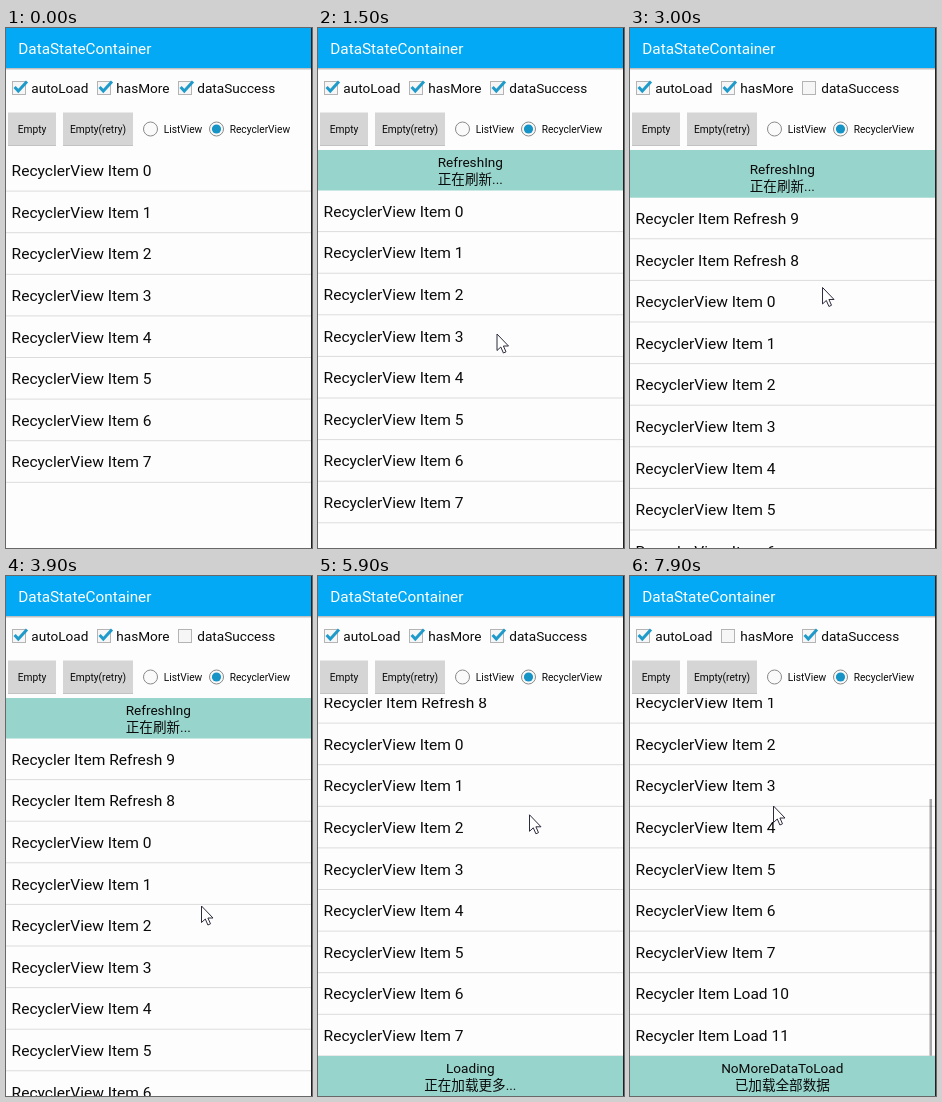
An HTML page for the animation above (8 s loop, 306 by 520 pixels).

```html
<!DOCTYPE html>
<html lang="en">
<head>
<meta charset="utf-8">
<title>DataStateContainer</title>
<style>
html, body { margin: 0; width: 100%; height: 100%; overflow: hidden; background: #fdfdfd; }
svg { display: block; width: 306px; height: 520px; }
text { font: 15.3px Roboto, "Noto Sans CJK SC", "Noto Sans CJK", sans-serif; fill: #0a0a0a; white-space: pre; }
.item { font-size: 15.55px; }
.mid { font-size: 13.6px; }
.small { font-size: 10.2px; }
.state { font-size: 13.6px; text-anchor: middle; }
</style>
</head>
<body>
<svg id="stage" viewBox="0 0 306 520" xmlns="http://www.w3.org/2000/svg">
  <defs>
    <clipPath id="view"><rect y="122" width="306" height="398"/></clipPath>
    <linearGradient id="shade" x2="0" y2="1">
      <stop stop-opacity=".3"/><stop offset="1" stop-opacity="0"/>
    </linearGradient>
  </defs>
  <rect width="306" height="520" fill="#fdfdfd"/>
  <g clip-path="url(#view)">
    <g id="list"></g>
    <g id="head"></g>
    <g id="foot"></g>
    <rect id="thumb" x="299.5" width="2.5" fill="#000" fill-opacity=".34"/>
  </g>
  <rect y="40" width="306" height="2.5" fill="url(#shade)"/>
  <rect width="306" height="40" fill="#03a9f4"/>
  <text x="12.3" y="26" style="fill:#fff">DataStateContainer</text>
  <g id="controls"></g>
  <rect x="305" width="1" height="520" fill="#222"/>
  <path id="cursor" d="M0 0V16.5L3.8 13L6.4 19L9 17.8L6.4 12H11.5Z" fill="#fff" stroke="#2b2b3c" stroke-linejoin="round"/>
</svg>
<script>
const LOOP = 8000, STEP = 100, TOP = 122, BAR = 40.5, ROW = 41.6, VIEW = 358;
const $ = id => document.getElementById(id);

function add(parent, tag, attrs, text) {
  const el = document.createElementNS('http://www.w3.org/2000/svg', tag);
  for (const k in attrs) el.setAttribute(k, attrs[k]);
  if (text) el.textContent = text;
  return parent.appendChild(el);
}
const show = (el, on) => el.setAttribute('visibility', on ? 'visible' : 'hidden');
const move = (el, x, y) => el.setAttribute('transform', `translate(${x} ${y})`);

// 0 before a, 1 after b, smooth between
function ease(t, a, b) {
  const p = Math.min(1, Math.max(0, (t - a) / (b - a)));
  return p * p * (3 - 2 * p);
}

const controls = $('controls');

function checkbox(x, label) {
  add(controls, 'rect', { x: x + .5, y: 53.5, width: 13, height: 13, fill: '#f6f6f6', stroke: '#b4b4b4' });
  const tick = add(controls, 'path', {
    d: `M${x + 2.6} 59l3.7 4l8.7 -9.4`, fill: 'none', stroke: '#1e9bcb', 'stroke-width': 3
  });
  add(controls, 'text', { x: x + 19.3, y: 65, class: 'mid' }, label);
  return tick;
}

function button(x, w, label) {
  add(controls, 'rect', { x, y: 84.5, width: w, height: 33.5, fill: '#d5d5d5' });
  add(controls, 'rect', { x, y: 117, width: w, height: 1, fill: '#c2c2c2' });
  add(controls, 'text', { x: x + w / 2, y: 105, class: 'small', 'text-anchor': 'middle' }, label);
}

function radio(x, label, on) {
  add(controls, 'circle', { cx: x, cy: 101, r: 7, fill: '#fafafa', stroke: '#8a8a8a' });
  if (on) add(controls, 'circle', { cx: x, cy: 101, r: 4.6, fill: '#1794c6' });
  add(controls, 'text', { x: x + 13.2, y: 105, class: 'small' }, label);
}

checkbox(6, 'autoLoad');
const moreTick = checkbox(91, 'hasMore');
const okTick = checkbox(172, 'dataSuccess');
button(2, 48, 'Empty');
button(57, 70, 'Empty(retry)');
radio(144.5, 'ListView', false);
radio(210.5, 'RecyclerView', true);

function banner(group, fillTop) {
  add(group, 'rect', { y: fillTop, width: 306, height: BAR - fillTop, fill: '#97d4cb' });
  return [17, 33.5].map(y => add(group, 'text', { x: 152.3, y, class: 'state', lang: 'zh-CN' }));
}
const label = (lines, texts) => lines.forEach((el, i) => el.textContent = texts[i]);

label(banner($('head'), -60), ['RefreshIng', '正在刷新...']);
const footText = banner($('foot'), 0);

const rows = Array.from({ length: 12 }, () => {
  const g = add($('list'), 'g');
  add(g, 'rect', { y: ROW - 1, width: 306, height: 1, fill: '#dcdcdc' });
  return { g, text: add(g, 'text', { x: 5.6, y: 26.3, class: 'item' }) };
});

const base = Array.from({ length: 8 }, (_, i) => 'RecyclerView Item ' + i);
const fresh = [9, 8].map(n => 'Recycler Item Refresh ' + n);
const loaded = [10, 11].map(n => 'Recycler Item Load ' + n);

// Pull down past the header, rest on it, then collapse
function pull(t, from, held, done) {
  const p = ease(t, from, held);
  return BAR * (p - ease(t, done, done + 300)) + 24 * Math.sin(Math.PI * p);
}

// Pointer trips: leave, arrive, x, y
const trips = [
  [100, 900, 179, 306],      // drag down
  [1500, 2500, 184, 58],     // untick dataSuccess
  [2600, 3200, 195.5, 330],  // drag down
  [3900, 4700, 177, 61],     // tick dataSuccess
  [4850, 5300, 172, 290],
  [5300, 5600, 185, 205],    // drag up
  [5600, 5900, 211.5, 238.8],
  [6500, 7300, 98, 58],      // untick hasMore
  [7450, 7700, 137, 312],
  [7700, 7900, 143.5, 230]   // drag up
];

function pointer(t) {
  let x = 168, y = 185;
  for (const [leave, arrive, tx, ty] of trips) {
    const p = ease(t, leave, arrive);
    x += (tx - x) * p;
    y += (ty - y) * p;
  }
  return [x, y];
}

function draw(t) {
  const items = [...(t >= 1900 ? fresh : []), ...base, ...(t >= 6300 ? loaded : [])];
  const drop = pull(t, 100, 900, 1700) + pull(t, 2700, 3200, 3900);
  const scroll = 57.6 * ease(t, 5300, 5600) + 2 * ROW * ease(t, 7700, 7900);
  const fade = ease(t, 5200, 5300) - ease(t, 5600, 5900) + ease(t, 7600, 7700);
  const size = items.length * ROW;

  move($('list'), 0, TOP + drop - scroll);
  rows.forEach(({ g, text }, i) => {
    show(g, i < items.length);
    move(g, 0, i * ROW);
    text.textContent = items[i] || '';
  });

  show($('head'), drop > 0.01);
  move($('head'), 0, TOP + drop - BAR);

  show($('foot'), t >= 5200);
  move($('foot'), 0, TOP + size - scroll - .4);
  label(footText, t < 7000 ? ['Loading', '正在加载更多...'] : ['NoMoreDataToLoad', '已加载全部数据']);

  const bar = VIEW * Math.min(1, VIEW / size), max = Math.max(1, size - VIEW);
  $('thumb').setAttribute('height', bar);
  $('thumb').setAttribute('y', TOP + (VIEW - bar) * Math.min(1, scroll / max));
  $('thumb').setAttribute('opacity', fade);

  show(okTick, t < 2500 || t >= 4800);
  show(moreTick, t < 7400);
  show($('cursor'), t >= 100);
  move($('cursor'), ...pointer(t));
}

const start = performance.now();
function frame() {
  const t = Math.max(0, performance.now() - start) % LOOP;
  draw(Math.floor(t / STEP) * STEP);
  requestAnimationFrame(frame);
}
draw(0);
requestAnimationFrame(frame);
</script>
</body>
</html>
```
